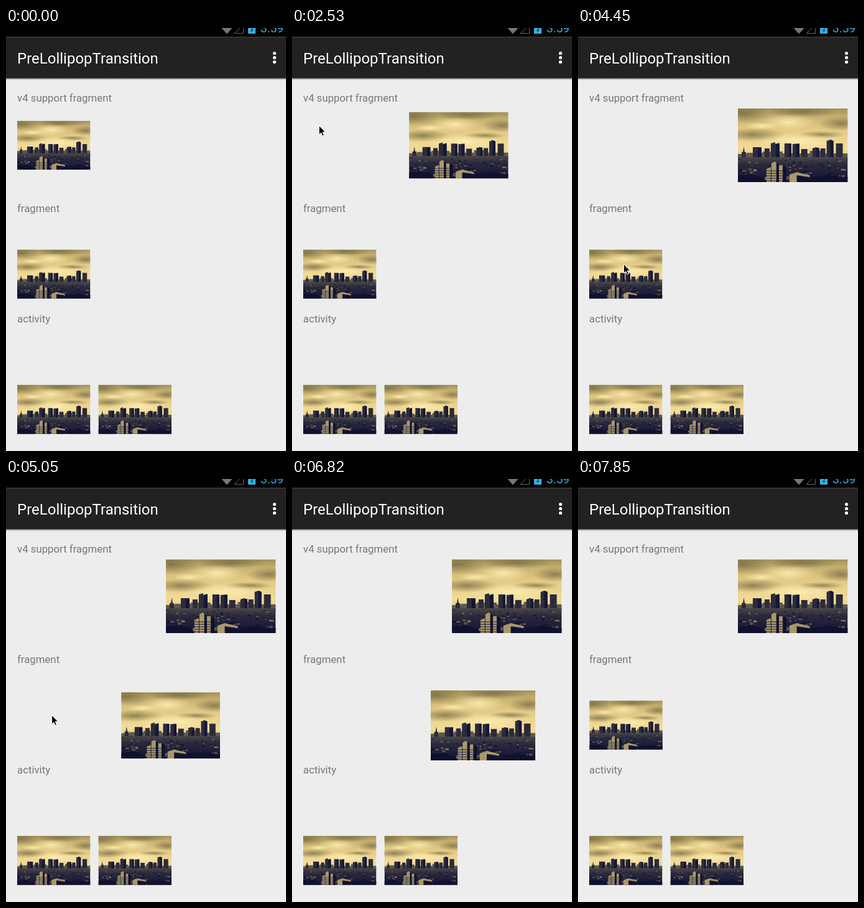
Recreate the animation shown at these times as an HTML page. Size 450 by 678 pixels, loop 8000 ms.

```html
<!DOCTYPE html>
<html lang="en">
<head>
<meta charset="utf-8">
<title>PreLollipopTransition</title>
<style>
  html, body { margin: 0; width: 100%; height: 100%; overflow: hidden; background: #ededed; }
  #stage { display: block; width: 450px; height: 678px; font-family: Roboto, sans-serif; }
  .label { font-size: 16.8px; fill: #777; }
</style>
</head>
<body>
<svg id="stage" viewBox="0 0 450 678">
  <defs>
    <linearGradient id="sky" x2="0" y2="1">
      <stop offset="0" stop-color="#a3925a"/>
      <stop offset=".2" stop-color="#cdb674"/>
      <stop offset=".42" stop-color="#e2c984"/>
      <stop offset=".8" stop-color="#f3dc98"/>
      <stop offset="1" stop-color="#dcc484"/>
    </linearGradient>
    <linearGradient id="city" x2="0" y2="1">
      <stop offset="0" stop-color="#4a4747"/>
      <stop offset=".3" stop-color="#2b2a3c"/>
      <stop offset="1" stop-color="#121236"/>
    </linearGradient>
    <radialGradient id="glow">
      <stop offset="0" stop-color="#fff0b4" stop-opacity=".85"/>
      <stop offset="1" stop-color="#fff0b4" stop-opacity="0"/>
    </radialGradient>
    <radialGradient id="cloud">
      <stop offset="0" stop-color="#6e6440" stop-opacity=".7"/>
      <stop offset="1" stop-color="#6e6440" stop-opacity="0"/>
    </radialGradient>
    <linearGradient id="shadow" x2="0" y2="1">
      <stop offset="0" stop-color="#555"/>
      <stop offset=".4" stop-color="#b5b5b5"/>
      <stop offset="1" stop-color="#ededed"/>
    </linearGradient>
    <symbol id="photo" viewBox="0 0 177 118" preserveAspectRatio="none">
      <rect width="177" height="80" fill="url(#sky)"/>
      <g fill="url(#cloud)">
        <ellipse cx="8" cy="8" rx="46" ry="16"/>
        <ellipse cx="24" cy="42" rx="52" ry="11"/>
        <ellipse cx="104" cy="5" rx="58" ry="9"/>
        <ellipse cx="166" cy="24" rx="36" ry="12"/>
        <ellipse cx="134" cy="42" rx="38" ry="6"/>
      </g>
      <g fill="url(#glow)">
        <ellipse cx="82" cy="22" rx="44" ry="13"/>
        <ellipse cx="96" cy="52" rx="66" ry="13"/>
        <ellipse cx="38" cy="28" rx="28" ry="6"/>
      </g>
      <path fill="#5d5850" d="M0 76V73H14V71H40V69H72V72H116V68H140V72H177V84H0Z"/>
      <path fill="#2c2b3a" d="M6 80V70H8L9.500 61 11 70H13V80ZM24 80V62H38V80ZM43 80V64H51V80ZM53 80V56L60 54V57L67 55V80ZM75 80V56H86V80ZM88 80V57L99 56V80ZM102 80V65H112V80ZM120 80V64L126 62 131 64V80ZM133 80V64H141V80ZM143 80V52L149 50 154 52V80ZM158 80V56H169V80Z"/>
      <path fill="#15163a" d="M32 80V63H38V80ZM61 80V57H67V80ZM82 80V57H86V80ZM94 80V57H99V80ZM127 80V63H131V80ZM149 80V50L154 52V80Z"/>
      <rect y="78" width="177" height="40" fill="url(#city)"/>
      <g id="roofs"></g>
      <path fill="#a8986a" d="M46 118V97L53 94V118ZM54 118V88L59 85 62 87V118ZM66 118V91H72V118ZM83 118V106L95 102 116 107V110L95 107V118Z"/>
      <path stroke="#1b1b3c" stroke-width="1" d="M46 100H72M46 104H72M46 108H72M46 112H72M46 116H72"/>
      <path fill="#10112f" d="M62 118V87L66 90V118ZM73 118V92H78V118ZM95 118V108L116 112V118ZM0 118V108L22 105 42 112V118ZM118 118V110L148 106 177 112V118Z"/>
    </symbol>
  </defs>

  <rect width="450" height="678" fill="#ededed"/>
  <rect y="80" width="450" height="4" fill="url(#shadow)"/>
  <rect width="450" height="14.500"/>
  <rect y="14.500" width="450" height="66" fill="#222"/>

  <path fill="#777" d="M346.500 0H363.500L355 9.500Z"/>
  <path fill="none" stroke="#666" d="M367 8.500H381.500V0M367 8.500L376 0"/>
  <rect x="389" width="12" height="9" fill="#33b5e5"/>
  <path fill="#174f66" d="M396 0L392.500 4.500H395L393.500 8 398 3H395.500L397.500 0Z"/>
  <text x="409" y="7" font-size="19.200" fill="#33b5e5">3:59</text>

  <text x="18" y="57" font-size="24" fill="#fff">PreLollipopTransition</text>
  <g fill="#fff">
    <circle cx="431.500" cy="40.500" r="2.600"/>
    <circle cx="431.500" cy="47.500" r="2.600"/>
    <circle cx="431.500" cy="54.500" r="2.600"/>
  </g>

  <text class="label" x="18" y="117.500">v4 support fragment</text>
  <text class="label" x="18" y="294.500">fragment</text>
  <text class="label" x="18" y="471.500">activity</text>

  <use id="top" href="#photo"/>
  <use id="mid" href="#photo"/>
  <use href="#photo" x="18" y="572" width="117.500" height="78.700"/>
  <use href="#photo" x="148.500" y="572" width="117.500" height="78.700"/>

  <path id="cursor" stroke="#fff" stroke-width="1" d="M0 0V14.500L3.300 11.400 5.600 16.600 8 15.600 5.700 10.500H10.200Z"/>
</svg>
<script>
  const LOOP = 8000, FIRST = 750, STEP = 148.1;
  const $ = id => document.getElementById(id);
  const lerp = (a, b, p) => a + (b - a) * p;
  const span = (t, from, to) => Math.min(1, Math.max(0, (t - from) / (to - from)));
  const decelerate = p => 1 - (1 - p) ** 2;
  const smooth = p => p * p * (3 - 2 * p);
  const slide = (t, from) => decelerate(span(t, from, from + 1000));

  // Rooftops grow towards the viewer.
  let seed = 11;
  const rand = () => (seed = seed * 16807 % 2147483647) / 2147483647;
  const tones = ['#10112f', '#1a1b3b', '#262740', '#55504a', '#81765a'];
  let roofs = '';
  for (let i = 0; i < 110; i++) {
    const depth = i / 110, size = 1 + depth * 2.5;
    const w = size * (1 + rand() * 2), h = size * (.5 + rand());
    roofs += `<rect x="${(rand() * 174).toFixed(1)}" y="${(79 + depth * 34).toFixed(1)}" ` +
      `width="${w.toFixed(1)}" height="${h.toFixed(1)}" fill="${tones[rand() * 5 | 0]}"/>`;
  }
  $('roofs').innerHTML = roofs;

  function place(el, y0, y1, p) {
    el.setAttribute('x', lerp(18, 257, p));
    el.setAttribute('y', lerp(y0, y1, p));
    el.setAttribute('width', lerp(117.5, 176.5, p));
    el.setAttribute('height', lerp(78.5, 118, p));
  }

  function cursorAt(t) {
    if (t < FIRST || t > 6000) return null;
    if (t < 3100) {
      const p = decelerate(span(t, FIRST, 1490));
      return [lerp(2.5, 43.5, p), lerp(133.5, 156.5, p) + (t > 2750 ? 2 : 0)];
    }
    if (t < 5400) {
      const p = smooth(span(t, 3120, 4160));
      return [lerp(43.5, 73.5, p), lerp(158.5, 378.5, p)];
    }
    const p = span(t, 5340, 5935) ** 1.3;
    return [lerp(73.5, 119, p), lerp(378.5, 647, p)];
  }

  const held = t => t < FIRST - 6 ? 0 : FIRST + STEP * Math.floor((t - FIRST + 6) / STEP);

  function draw(now) {
    const t = held(now % LOOP);
    place($('top'), 148.7, 129, slide(t, 2064));
    place($('mid'), 355.2, 336, slide(t, 4593) - slide(t, 6748));
    const at = cursorAt(t);
    $('cursor').setAttribute('visibility', at ? 'visible' : 'hidden');
    if (at) $('cursor').setAttribute('transform', `translate(${at})`);
  }

  function tick() {
    draw(performance.now());
    requestAnimationFrame(tick);
  }
  tick();
</script>
</body>
</html>
```
